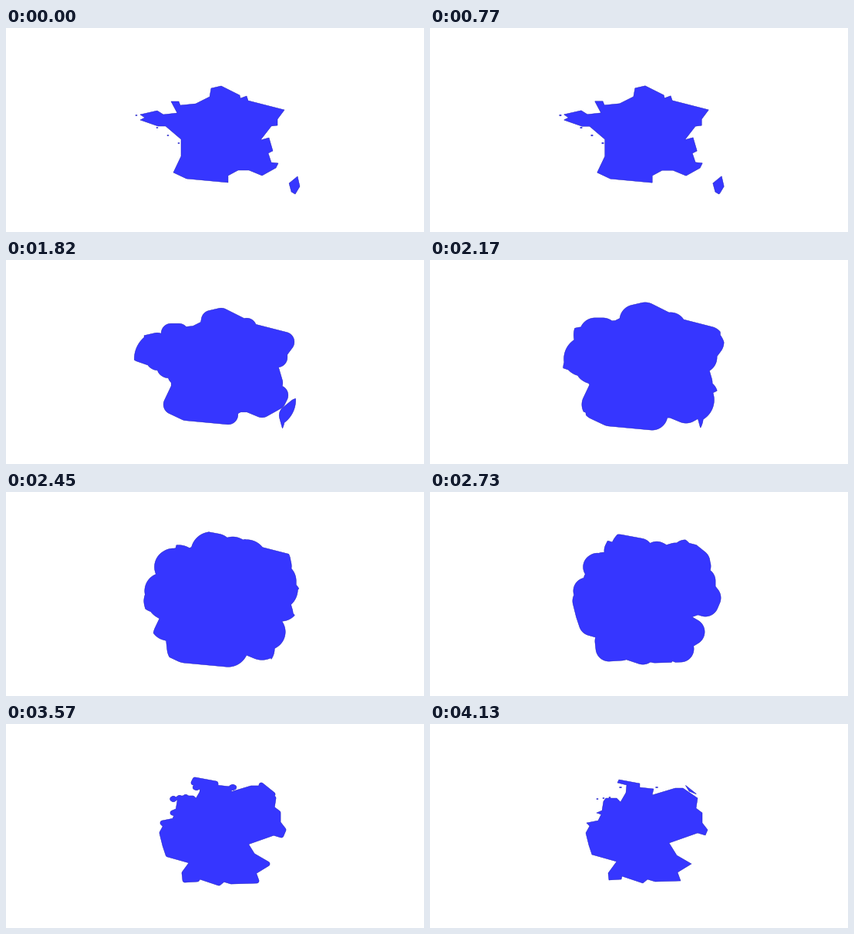
A matplotlib script that plays this animation: 542x264 px, repeating every 4.83 s.

```python
import numpy as np
import matplotlib.pyplot as plt
from matplotlib.animation import FuncAnimation
from matplotlib.path import Path

W, H, DPI = 542, 264, 100
FRAMES, INTERVAL = 69, 70
HOLD, STEPS = 9, 50
FILL, EDGE = "#3636ff", "#1616b4"


def outline(text):
    """Turn 'x,y x,y ...' into an array of corner points."""
    return np.array([p.split(",") for p in text.split()], float)


def islets(start, end, count, rx=1.3, ry=0.8):
    """A chain of small diamonds spaced evenly along a line."""
    diamond = np.array([(-rx, 0), (0, -ry), (rx, 0), (0, ry)])
    return [diamond + centre for centre in np.linspace(start, end, count)]


france = [
    outline("266,78 279,75 303,87 304,91 312,88 314,94 361,106 352,118 352,126 "
            "344,127 330,145 341,142 346,159 340,162 344,174 353,175 350,181 "
            "332,191 315,184 301,184 288,191 288,200 234,195 217,187 227,166 "
            "227,144 207,127 197,127 174,119 180,116 174,112 196,107 204,112 "
            "222,110 214,95 224,95 226,100 246,98 264,89"),
    outline("378,192 381,205 375,215 370,212 367,201"),
    *islets((169, 113), (169, 113), 1),
    *islets((196, 129), (224, 149), 3),
]

germany = [
    outline("245,72 272,77 272,82 290,84 288,92 318,83 328,83 347,96 345,109 "
            "353,115 353,128 360,137 357,144 347,141 310,154 320,170 339,181 "
            "321,192 325,203 292,204 282,201 276,206 249,197 248,201 232,202 "
            "231,193 242,178 210,169 206,157 202,141 207,132 203,128 218,125 "
            "222,117 216,115 223,112 225,100 228,96 242,96 247,101 254,89 "
            "255,79 243,76"),
    outline("331,79 346,91 336,87"),
    *islets((217, 97), (233, 95), 3),
    *islets((247, 82), (294, 82), 2, 1.8),
]


def signed_distance(shapes, xs, ys):
    """Distance to the nearest outline, negative inside."""
    best = np.full(xs.shape, np.inf)
    inside = np.zeros(xs.shape, bool)
    points = np.column_stack([xs.ravel(), ys.ravel()])
    for poly in shapes:
        closed = np.vstack([poly, poly[:1]])
        inside |= Path(closed).contains_points(points).reshape(xs.shape)
        for (x0, y0), (x1, y1) in zip(closed[:-1], closed[1:]):
            dx, dy = x1 - x0, y1 - y0
            t = ((xs - x0) * dx + (ys - y0) * dy) / (dx * dx + dy * dy)
            t = np.clip(t, 0, 1)
            best = np.minimum(best, (xs - x0 - t * dx) ** 2 + (ys - y0 - t * dy) ** 2)
    best = np.sqrt(best)
    return np.where(inside, -best, best)


X, Y = np.meshgrid(np.arange(150, 396, 0.5), np.arange(44, 238, 0.5))
dist_a = signed_distance(france, X, Y)
dist_b = signed_distance(germany, X, Y)
# Hausdorff distance between the two countries
reach = max(dist_b[dist_a <= 0].max(), dist_a[dist_b <= 0].max())

fig = plt.figure(figsize=(W / DPI, H / DPI), dpi=DPI, facecolor="white")
ax = fig.add_axes([0, 0, 1, 1])
ax.set_xlim(0, W)
ax.set_ylim(H, 0)
ax.axis("off")


def draw(frame):
    for old in list(ax.collections):
        old.remove()
    t = np.clip(frame - HOLD, 0, STEPS) / STEPS
    grow = reach * (1 - np.cos(np.pi * t)) / 2
    # overlap of both countries, one growing while the other shrinks
    field = np.maximum(dist_a - grow, dist_b - (reach - grow))
    ax.contourf(X, Y, field, levels=[-1000, 0], colors=[FILL], antialiased=True)
    ax.contour(X, Y, field, levels=[0], colors=[EDGE], linewidths=0.3,
               linestyles="solid", antialiased=True)
    return list(ax.collections)


anim = FuncAnimation(fig, draw, frames=FRAMES, init_func=lambda: draw(0),
                     interval=INTERVAL, repeat=True, repeat_delay=0, blit=False)
plt.show()
```
